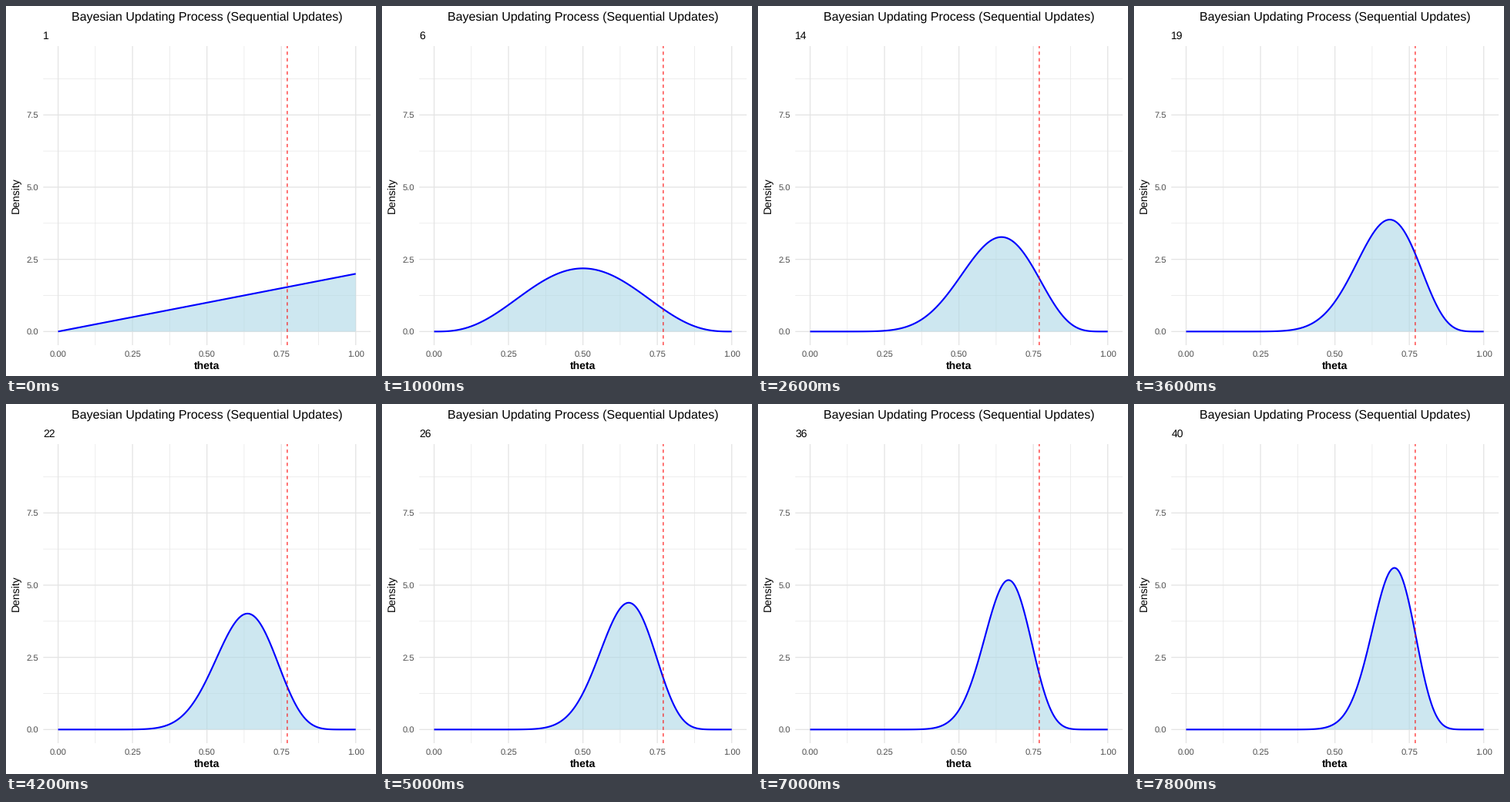
Write a matplotlib script that moves like this. It is 480 px wide and 480 px high and loops after 8 s.

```python
import math

import matplotlib.pyplot as plt
import numpy as np
from matplotlib.animation import FuncAnimation

SIZE, DPI = 480, 96
PT = 72 / DPI  # points per pixel

LEFT, RIGHT, TOP, BOTTOM = 48.3, 473.0, 52.0, 440.0
X0, X_UNIT = 67.6, 386.1
Y0, Y_UNIT = 422.3, 37.46

TRIALS = 40
FAILURES = {2, 4, 5, 8, 11, 16, 20, 21, 24, 31, 32, 34}
TRUE_THETA = 0.77

plt.rcParams.update({
    "font.family": "Liberation Sans",
    "text.hinting": "none",
    "path.simplify": False,
})

fig = plt.figure(figsize=(SIZE / DPI, SIZE / DPI), dpi=DPI, facecolor="white")
ax = fig.add_axes([0, 0, 1, 1])
ax.set_xlim(0, SIZE)
ax.set_ylim(SIZE, 0)
ax.axis("off")


def px(theta):
    return X0 + theta * X_UNIT


def py(density):
    return Y0 - density * Y_UNIT


def line(xs, ys, color, width, **style):
    item, = ax.plot(xs, ys, color=color, lw=width * PT,
                    solid_capstyle="butt", dash_capstyle="butt", **style)
    item.set_snap(False)
    return item


def label(x, y, text, size, **style):
    style = {"color": "black", "ha": "center", "va": "baseline", **style}
    return ax.text(x, y, text, fontsize=size * PT, **style)


def grid(x_ticks, y_ticks, color, width):
    for y in y_ticks:
        line([LEFT, RIGHT], [py(y)] * 2, color, width, zorder=1)
    for x in x_ticks:
        line([px(x)] * 2, [BOTTOM, TOP], color, width, zorder=1)


def posterior(n):
    """Beta density after n trials, starting from a flat prior."""
    fails = sum(k <= n for k in FAILURES)
    wins = n - fails
    scale = (n + 1) * math.comb(n, wins)
    return scale * theta**wins * (1 - theta)**fails


x_major = np.arange(5) / 4
y_major = np.arange(4) * 2.5
grid(x_major[:-1] + 0.125, y_major + 1.25, "#e8e8e8", 0.75)
grid(x_major, y_major, "#e4e4e4", 1.3)

for x in x_major:
    label(px(x), 455, f"{x:.2f}", 11.2, color="#4d4d4d")
for y in y_major:
    label(42.3, py(y) + 4, f"{y:.1f}", 11.2, color="#4d4d4d", ha="right")

label(260.6, 19, "Bayesian Updating Process (Sequential Updates)", 16)
label(260.6, 471, "theta", 14, weight="bold")
label(17, 246, "Density", 14, rotation=90, rotation_mode="anchor")
counter = label(LEFT, 43, "", 14, ha="left")

theta = np.linspace(0, 1, 200)
area, = ax.fill([X0, X0 + 1, X0], [Y0] * 3, color="lightblue", alpha=0.6,
                lw=0, zorder=2)
curve = line(px(theta), np.full_like(theta, Y0), "blue", 2.13, zorder=3)
line([px(TRUE_THETA)] * 2, [BOTTOM, TOP], "red", 1.07,
     linestyle=(0, (4, 4)), zorder=4)


def update(i):
    n = i + 1
    ys = py(posterior(n))
    curve.set_ydata(ys)
    outline = np.column_stack([px(theta), ys])
    area.set_xy(np.vstack([[X0, Y0], outline, [px(1), Y0]]))
    counter.set_text(str(n))
    return area, curve, counter


anim = FuncAnimation(fig, update, frames=TRIALS, interval=200,
                     repeat=True, repeat_delay=0, blit=False)
plt.show()
```
